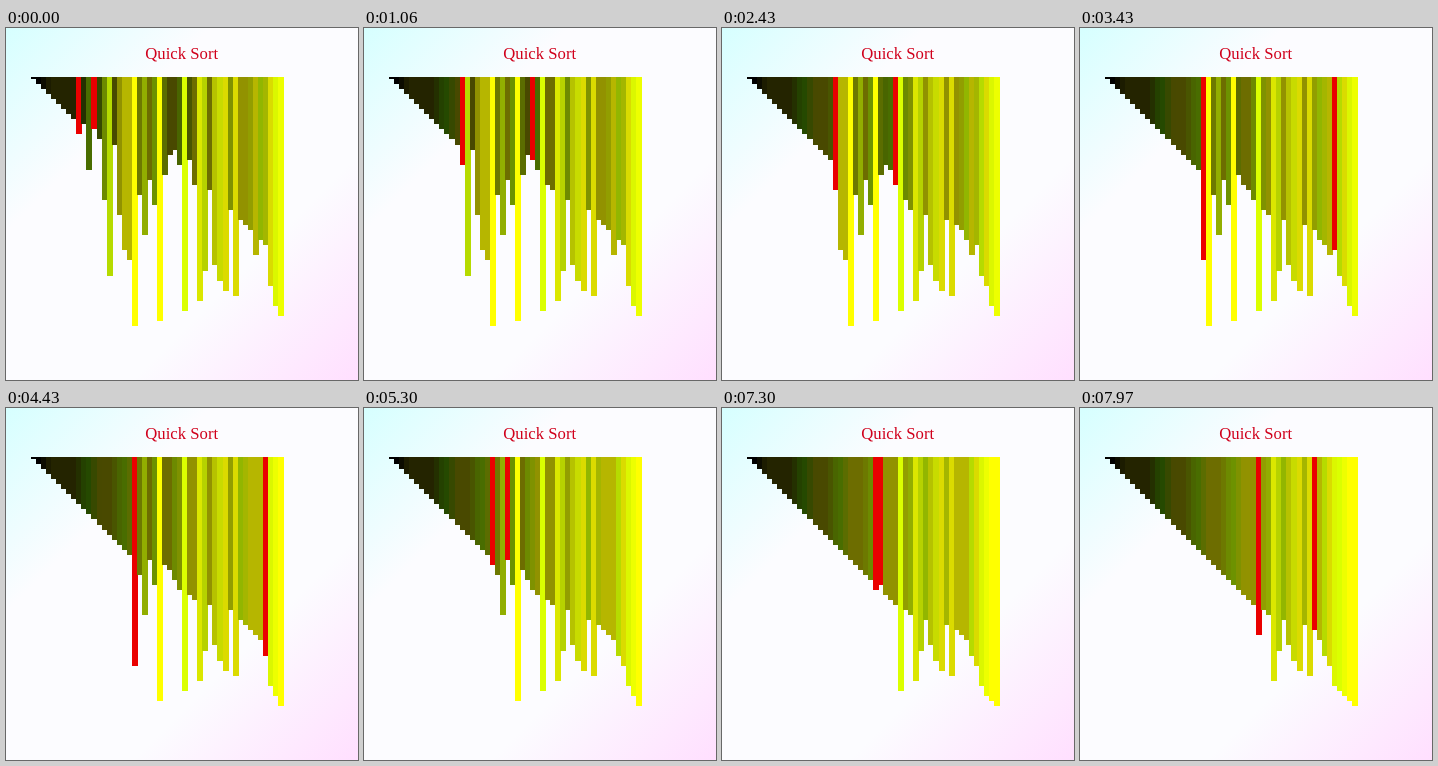
These frames come from a looping animation (352x352 px, 8 s). An HTML page:

```html
<!DOCTYPE html>
<html lang="en">
<head>
<meta charset="utf-8">
<title>Quick Sort</title>
<style>
  html, body { margin: 0; width: 100%; height: 100%; overflow: hidden; }
  body {
    position: relative;
    background: linear-gradient(135deg, #d6ffff 0%, #fcfcff 29%, #fcfcff 68%, #ffdfff 100%);
  }
  svg { position: absolute; left: 0; top: 0; display: block; }
  text { font: 16.7px "Liberation Serif", "Times New Roman", serif; fill: #d0001c; text-anchor: middle; }
</style>
</head>
<body>
<svg width="352" height="352" viewBox="0 0 352 352">
  <text x="175.7" y="31">Quick Sort</text>
  <g id="bars" shape-rendering="crispEdges"></g>
</svg>
<script>
const LOOP = 8000, STEP = 62.5, OFFSET = 20.5, HOLD = 360;
const FRAMES_PER_MS = 0.03;
const LEFT = 25, TOP = 49, UNIT = 5.04, RED = '#ea0000';

const start = [
  0, 1, 2, 3, 4, 5, 6, 7, 8, 11, 9, 18, 10, 12, 24, 39, 13, 27, 34, 36,
  49, 23, 31, 20, 25, 48, 19, 15, 14, 17, 46, 16, 21, 44, 38, 22, 37, 40, 42, 26,
  43, 28, 29, 30, 35, 32, 33, 41, 45, 47
];

// Each step is the state just before a swap; every pass ends with i meeting itself.
function recordSteps(values, firstI, firstJ, count) {
  const a = [...values], steps = [];
  let i = firstI, j = firstJ;
  while (steps.length < count && i < a.length) {
    if (a[j] <= a[i]) {
      steps.push({ values: [...a], i, j });
      [a[i], a[j]] = [a[j], a[i]];
    }
    if (--j < i) { i++; j = a.length - 1; }
  }
  return steps;
}

// Colour levels with soft steps; green climbs before red except in the darkest level.
function channel(value, from, to) {
  const level = value / 7, base = Math.floor(level);
  const p = Math.min(1, Math.max(0, (level - base - from) / (to - from)));
  return Math.min(255, Math.round((base + p) * 255 / 7));
}
function barColor(v) {
  const green = channel(v, 0.18, 0.5);
  const red = v < 7 ? green : channel(v, 0.57, 0.86);
  return `rgb(${red},${green},0)`;
}

const colors = start.map((_, v) => barColor(v));
const steps = recordSteps(start, 9, 12, 128);
const group = document.getElementById('bars');
const edge = i => Math.round(LEFT + UNIT * i);

// Bars are one pixel wider than their pitch; each covers the edge of the one before.
const bars = start.map((_, i) => {
  const rect = document.createElementNS('http://www.w3.org/2000/svg', 'rect');
  rect.setAttribute('x', edge(i));
  rect.setAttribute('y', TOP);
  rect.setAttribute('width', edge(i + 1) - edge(i) + 1);
  group.append(rect);
  return rect;
});

function draw({ values, i, j }) {
  bars.forEach((bar, n) => {
    const v = values[n];
    bar.setAttribute('height', Math.round(UNIT * v) + 2);
    bar.setAttribute('fill', n === i || n === j ? RED : colors[v]);
  });
}

function stepAt(ms) {
  const t = Math.floor((ms + 7) * FRAMES_PER_MS) / FRAMES_PER_MS;
  if (t < HOLD) return 0;
  return Math.min(steps.length - 1, Math.floor((t - OFFSET) / STEP));
}

let shown = -1;
const origin = performance.now();
function tick() {
  const k = stepAt((performance.now() - origin) % LOOP);
  if (k !== shown) draw(steps[shown = k]);
  requestAnimationFrame(tick);
}
tick();
</script>
</body>
</html>
```
